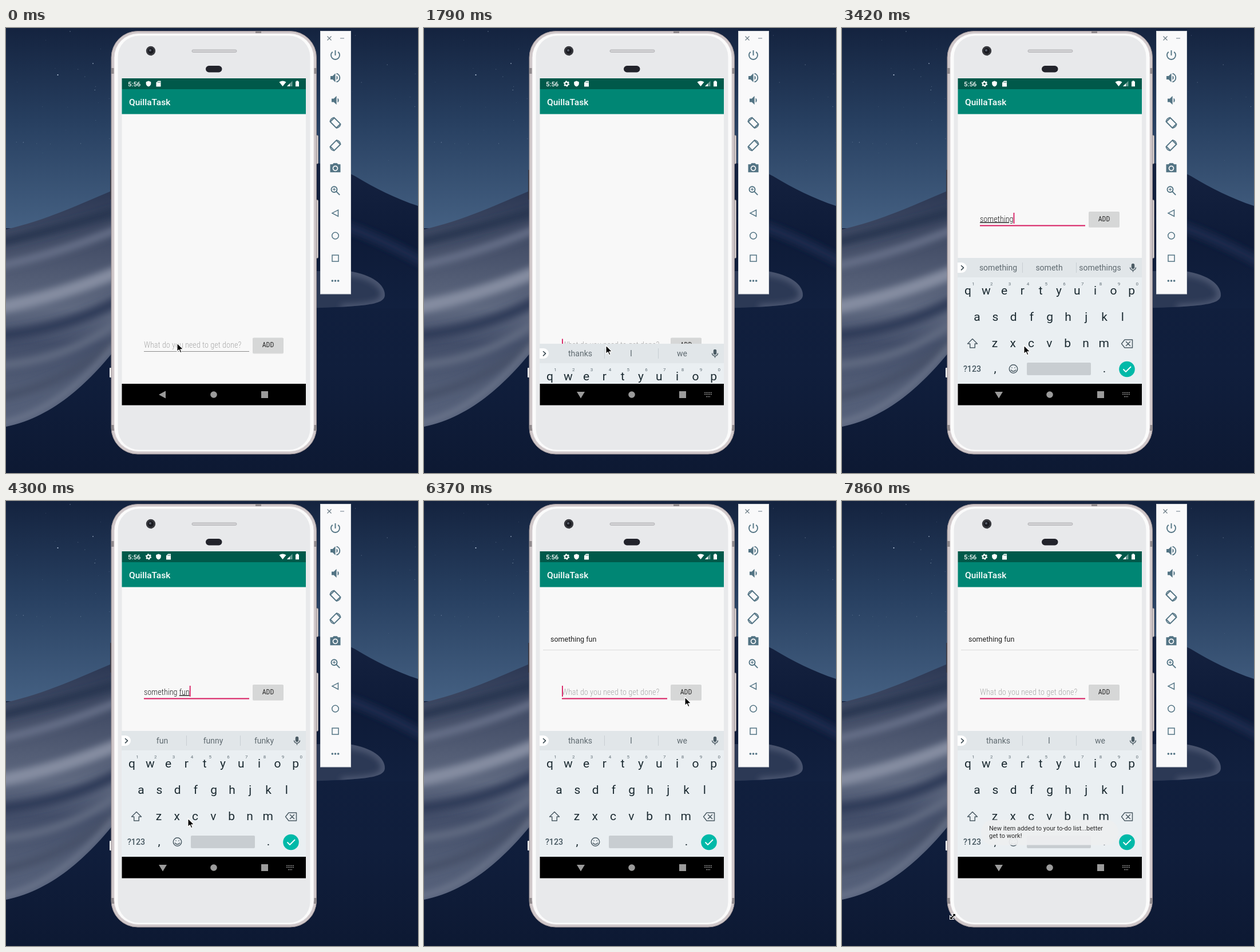
An HTML page that plays this animation: 720 px wide and 778 px high, repeating every 8000 ms.

```html
<!DOCTYPE html>
<html lang="en">
<head>
<meta charset="utf-8">
<title>To-do demo</title>
<style>
html, body { margin: 0; width: 100%; height: 100%; overflow: hidden; background: #101d3a; }
svg { display: block; width: 720px; height: 778px; }
text { font-family: Roboto, "Open Sans", sans-serif; white-space: pre; }
.narrow { font-family: "Roboto Condensed", Roboto, sans-serif; font-stretch: 75%; }
.mid { text-anchor: middle; }
.line { fill: none; stroke-linecap: round; stroke-linejoin: round; }
</style>
</head>
<body>
<svg viewBox="0 0 720 778">
<defs>
  <linearGradient id="sky" x1="0" y1="0" x2="0" y2="1">
    <stop offset="0" stop-color="#14233f"/><stop offset=".45" stop-color="#273f60"/><stop offset="1" stop-color="#466284"/>
  </linearGradient>
  <linearGradient id="dune" x1="0" y1="285" x2="0" y2="697" gradientUnits="userSpaceOnUse">
    <stop offset="0" stop-color="#2c3854"/><stop offset=".25" stop-color="#465069"/><stop offset=".5" stop-color="#5f6980"/>
    <stop offset=".65" stop-color="#434e69"/><stop offset=".85" stop-color="#525d76"/><stop offset="1" stop-color="#56617b"/>
  </linearGradient>
  <linearGradient id="shade" x1="0" y1="250" x2="0" y2="490" gradientUnits="userSpaceOnUse">
    <stop offset="0" stop-color="#14213f"/><stop offset=".5" stop-color="#0e1b38"/><stop offset="1" stop-color="#11203f"/>
  </linearGradient>
  <linearGradient id="ground" x1="0" y1="0" x2="0" y2="1">
    <stop offset="0" stop-color="#11203f"/><stop offset=".6" stop-color="#101e3c"/><stop offset="1" stop-color="#0d1933"/>
  </linearGradient>
  <filter id="soft" x="-30%" y="-30%" width="160%" height="160%"><feGaussianBlur stdDeviation="6"/></filter>
  <clipPath id="dunes"><path d="M0 352C70 336 125 310 200 278V550C150 615 85 680 0 697Z"/></clipPath>
  <clipPath id="tail"><path d="M500 425H600C640 432 662 448 662 467C661 483 635 488 500 490Z"/></clipPath>
  <clipPath id="page"><rect x="202" y="150.500" width="322" height="472"/></clipPath>
</defs>

<!-- wallpaper -->
<rect width="720" height="360" fill="url(#sky)"/>
<g id="stars" fill="#c5d3e6"/>
<rect y="350" width="720" height="428" fill="url(#ground)"/>
<path d="M500 230C560 236 585 246 610 259C645 280 680 298 720 311V490H500Z" fill="url(#shade)"/>
<path class="line" d="M560 335Q640 360 730 410" stroke="#1b2b4d" stroke-width="16" filter="url(#soft)"/>
<g clip-path="url(#tail)">
  <rect x="500" y="420" width="165" height="72" fill="#2c3955"/>
  <path class="line" d="M600 427C640 432 662 448 662 467C661 483 635 488 590 489" stroke="#56617a" stroke-width="10" filter="url(#soft)"/>
</g>
<g clip-path="url(#dunes)">
  <rect y="270" width="200" height="430" fill="url(#dune)"/>
  <g class="line" filter="url(#soft)" stroke-width="14">
    <path d="M-10 375Q90 352 200 318" stroke="#27344f"/>
    <path d="M-10 416Q90 395 200 350" stroke="#667088"/>
    <path d="M-10 488Q90 470 200 425" stroke="#858da1" stroke-width="22"/>
    <path d="M-10 538Q110 525 200 475" stroke="#323e5a" stroke-width="20"/>
    <path d="M-10 590Q110 580 200 510" stroke="#606a81"/>
    <path d="M-10 645Q100 625 200 540" stroke="#465169"/>
    <path d="M-10 692Q90 672 190 556" stroke="#737d92" stroke-width="7"/>
  </g>
</g>

<!-- phone -->
<g fill="#d9d3d4" stroke="#8f8789">
  <rect x="539.500" y="187.500" width="6" height="50" rx="2"/>
  <rect x="539.500" y="300.500" width="6" height="102" rx="2"/>
</g>
<rect x="181" y="594" width="5" height="17" rx="1" fill="#f3f3f3"/>
<rect x="182" y="248" width="3" height="52" fill="#30313d"/>
<rect x="184" y="5.500" width="358.500" height="739.500" rx="46" fill="#cfc7c9" stroke="#998f92"/>
<g fill="#8f898c">
  <path d="M184 70h8v10h-8zM535 70h8v10h-8zM184 694h8v10h-8zM535 694h8v10h-8zM436 5h10v5h-10z"/>
</g>
<rect x="189" y="9.500" width="349" height="731" rx="42" fill="#fbfbfb" stroke="#ddd6d8"/>
<rect x="195.500" y="13.500" width="336" height="724" rx="37" fill="#e8e9eb"/>
<rect x="325" y="38" width="78" height="4.500" rx="2.200" fill="#d1d1d3" stroke="#a9a9ac" stroke-width=".8"/>
<circle cx="253" cy="40" r="8.200" fill="#37383d"/><circle cx="253" cy="40" r="5" fill="#191a20"/><circle cx="252" cy="39" r="2" fill="#5b606c"/>
<rect x="349" y="66" width="28.500" height="11.500" rx="5.700" fill="#22232b"/>

<!-- app -->
<rect x="202.500" y="88" width="321.500" height="571" fill="#f8f8f8"/>
<rect x="202.500" y="107" width="321.500" height="43.500" fill="#008674"/>
<rect x="202.500" y="88" width="321.500" height="19" fill="#00594a"/>
<text x="215" y="134.500" font-size="15.500" font-weight="500" fill="#fff">QuillaTask</text>
<g fill="#fff">
  <text x="213" y="101.500" font-size="11.300" font-weight="500">5:56</text>
  <g id="gear" fill="none" stroke="#fff">
    <circle cx="249" cy="97.500" r="2.900" stroke-width="2"/>
    <circle cx="249" cy="97.500" r="4.400" stroke-width="1.600" stroke-dasharray="2.300 2.308"/>
  </g>
  <g id="notices">
    <path d="M249 92.500l4.300 1.700v3c0 2.600-1.800 4.600-4.300 5.400c-2.500-.8-4.300-2.800-4.300-5.400v-3z"/>
    <path d="M265.500 92.500h5v10h-8v-7z"/><path d="M265.500 94v2M267.300 94v2M269 94v2" stroke="#00594a" stroke-width=".7"/>
  </g>
  <path d="M477.500 94.500Q483.500 90.300 489.500 94.500L483.500 102Z"/>
  <path d="M500.500 92.500V102H491Z" opacity=".4"/><path d="M496 97v5h-5z"/>
  <path d="M507.500 92.300h3v1.200h1.500v8.800h-6v-8.800h1.500z"/>
</g>

<g clip-path="url(#page)">
  <g id="item">
    <text x="221" y="246" font-size="12.500" fill="#212121">something fun</text>
    <rect x="208" y="260" width="310" height="1" fill="#dadada"/>
  </g>
  <g id="entry">
    <text id="hint" class="narrow" x="241" y="559" font-weight="300" fill="#a9a9a9">What do you need to get done?</text>
    <text id="typed" class="narrow" x="241" y="559" font-weight="300" fill="#222"><tspan></tspan><tspan text-decoration="underline"></tspan></text>
    <rect id="underline" x="241" width="184"/>
    <rect id="caret" y="543.500" width="1.800" height="19" fill="#d81b60"/>
    <rect x="431" y="542.500" width="54" height="27" rx="2" fill="#000" opacity=".1"/>
    <rect x="431" y="541.500" width="54" height="27" rx="2" fill="#d6d7d7"/>
    <text class="narrow mid" x="458" y="558.300" font-size="12" fill="#2a2a2a">ADD</text>
  </g>
  <g id="keyboard">
    <rect x="202" y="402" width="322" height="221" fill="#eaeff2"/>
    <rect x="202" y="402" width="322" height="34" fill="#e1e6e9"/>
    <path d="M202 410h7a9 9 0 0 1 0 18h-7z" fill="#fff"/>
    <path class="line" d="M208.500 415.500l4 3.700l-4 3.700" stroke="#37474f" stroke-width="1.600"/>
    <path d="M315.500 410v18M409.500 410v18" stroke="#c8ced2"/>
    <g id="words" class="mid" font-size="14" fill="#5f6a70"></g>
    <g fill="none" stroke="#4c5c65" stroke-width="1.500">
      <rect x="506.500" y="412.500" width="4" height="8" rx="2" fill="#4c5c65"/>
      <path d="M503.500 418.500a5 5 0 0 0 10 0M508.500 423.500v3"/>
      <path class="line" d="M228 543.500l8.500 8.500h-4.200v7h-8.600v-7h-4.200z"/>
      <path class="line" d="M494 545h13.500v14H494l-5.500-7zM496.500 548.500l7 7M503.500 548.500l-7 7"/>
      <circle cx="299.500" cy="596" r="7.200"/>
      <path class="line" d="M295.500 598q4 4.500 8 0M296.900 593.800v.2M302.100 593.800v.2"/>
    </g>
    <g id="keys" class="mid" fill="#1b2a31" font-size="21">
      <text x="267.500" y="602">,</text><text x="458.500" y="602">.</text>
    </g>
    <text class="mid" x="227.500" y="601" font-size="14.200" font-weight="500" fill="#465760">?123</text>
    <rect x="323" y="585" width="112" height="22" rx="2" fill="#c8cdd1"/>
    <circle cx="498" cy="596.500" r="13.800" fill="#00b9a8"/>
    <path class="line" d="M492 597l4 4l8.500-8.500" stroke="#fff" stroke-width="1.800"/>
  </g>
  <g id="toast">
    <rect x="243" y="557.500" width="240" height="44" rx="21" fill="#eeeff0" opacity=".93"/>
    <g font-size="11" fill="#2b2b2b">
      <text x="257" y="576">New item added to your to-do list...better</text>
      <text x="257" y="589">get to work!</text>
    </g>
  </g>
</g>

<rect x="202.500" y="622" width="321.500" height="37.500" fill="#000"/>
<g fill="#9b9b9b">
  <path id="back"/>
  <circle cx="363" cy="641" r="5.800"/><rect x="446" y="635" width="12" height="12"/>
  <path id="imeIcon" d="M490 637.500h13M490 640.500h13M493 644.500h7" stroke="#9b9b9b" stroke-width="1.600" stroke-dasharray="1.700 1.100"/>
</g>

<!-- emulator toolbar -->
<rect x="549.500" y="5.500" width="53" height="459.500" fill="#f9f9fa" stroke="#d5d8dc"/>
<path d="M561.500 14.500l7 7M568.500 14.500l-7 7M584 18h7" stroke="#6b7b85" stroke-width="1.200"/>
<g id="tools" stroke="#537484" fill="none" stroke-width="1.900"></g>

<g id="arrow"><path d="M0 0V14.600L3.400 11.500L5.700 16.700L8 15.700L5.800 10.700H10.500Z" fill="#000" stroke="#fff" stroke-width="1.100" stroke-linejoin="round"/></g>
<g id="resize">
  <path d="M5 -5H-1.500L.7 -2.800L-2.800 .7L-5 -1.500V5H1.500L-.7 2.800L2.800 -.7L5 1.500Z" fill="#000" stroke="#fff" stroke-width="1.100"/>
</g>
</svg>

<script>
const LOOP = 8000;
const $ = id => document.getElementById(id);
const show = (id, on) => $(id).setAttribute("visibility", on ? "visible" : "hidden");
const move = (id, x, y) => $(id).setAttribute("transform", `translate(${x} ${y})`);
const label = (x, y, text, extra = "") => `<text x="${x}" y="${y}" ${extra}>${text}</text>`;

// Value of the last [time, ...value] entry that has begun.
const held = (track, t) => track.reduce((last, entry) => entry[0] <= t ? entry : last).slice(1);

function drawStars() {
  let seed = 11;
  const random = () => (seed = seed * 16807 % 2147483647) / 2147483647;
  let dots = "";
  for (let i = 0; i < 34; i++) {
    const x = i % 3 ? random() * 182 : 605 + random() * 115;
    dots += `<circle cx="${x}" cy="${random() * 250}" r="${.3 + random() * .4}" opacity="${.2 + random() * .4}"/>`;
  }
  $("stars").innerHTML = dots + '<circle cx="90.500" cy="82" r="1"/><circle cx="152" cy="62" r=".8"/>';
}

function drawKeys() {
  const rows = [["qwertyuiop", 220, 466], ["asdfghjkl", 236, 512], ["zxcvbnm", 267, 558]];
  const letters = rows.flatMap(([row, x, y]) => [...row].map((c, i) => label(x + i * 31.8, y, c)));
  const digits = [..."1234567890"].map((d, i) =>
    label(229.5 + i * 31.8, 450, d, 'font-size="8" fill="#5f6d75"'));
  $("keys").innerHTML += letters.join("") + digits.join("");
}

function drawTools() {
  const speaker = x => `<path d="M${x} -3h3.800l4.800-4.700v15.400l-4.800-4.700h-3.800z" fill="#537484" stroke="none"/>`;
  const turn = '<rect x="-5" y="-7.500" width="10" height="15" rx="1" transform="rotate(-45)"/>' +
    '<path d="M-9.500 -1.500A9.800 9.800 0 0 1 -1.500 -9.500M1.500 9.500A9.800 9.800 0 0 0 9.500 1.500" stroke-width="1.500"/>';
  const icons = [
    '<path d="M0 -8.500v9M-4.800 -5.800a7.500 7.500 0 1 0 9.600 0"/>',
    speaker(-8.5) + '<path d="M2 -3.800a4.300 4.300 0 0 1 0 7.600z" fill="#537484" stroke="none"/><path d="M2 -7.300a7.500 7.500 0 0 1 0 14.600"/>',
    speaker(-6.5) + '<path d="M4 -3.800a4.300 4.300 0 0 1 0 7.600z" fill="#537484" stroke="none"/>',
    turn,
    `<g transform="scale(-1 1)">${turn}</g>`,
    '<path d="M-3 -8.500h6l1.700 2h4.300v14h-18v-14h4.300z" fill="#537484" stroke="none"/><circle cy=".6" r="4" stroke="#f9f9fa" stroke-width="1.700"/>',
    '<circle cx="-2" cy="-2" r="5"/><path d="M1.700 1.700l6 6"/><path d="M-4.500 -2h5M-2 -4.500v5" stroke-width="1.200"/>',
    '<path d="M5 -5.500v11l-10.500-5.500z" stroke-width="1.500"/>',
    '<circle r="5.800" stroke-width="1.500"/>',
    '<rect x="-5.500" y="-5.500" width="11" height="11" stroke-width="1.500"/>',
    '<path d="M-5.200 0h.1M-.050 0h.1M5.100 0h.1" stroke-width="3.600" stroke-linecap="round"/>'
  ];
  $("tools").innerHTML = icons.map((icon, i) =>
    `<g transform="translate(575.500 ${47.500 + i * 39.450})">${icon}</g>`).join("");
}

// One font size for the entry field, so the prompt keeps its place.
function sizeEntry() {
  const hint = $("hint");
  hint.setAttribute("font-size", 14.4);
  const size = 14.4 * 170 / hint.getComputedTextLength();
  for (const id of ["hint", "typed"]) $(id).setAttribute("font-size", size.toFixed(2));
}

const pointer = [
  [0, 299, 551], [1050, 303, 552], [1200, 314, 555], [1340, 318, 555],
  [4600, 316, 520], [4750, 308, 450], [4900, 306, 382], [5030, 345, 356],
  [5180, 425, 345], [5320, 466, 340], [5470, 459, 338],
  [6370, 456, 343], [6520, 445, 356], [6670, 434, 365], [6820, 365, 480],
  [6970, 245, 665], [7120, 193, 727]
];
const carets = [
  [0, false], [1640, true], [2090, false], [2690, true], [4750, false], [5180, true],
  [5770, false], [6220, true], [6820, false], [7270, true], [7860, false]
];
// Finished text, then the word being composed.
const typing = [
  [0, "", ""], [2840, "", "s"], [2990, "", "some"], [3140, "", "someth"], [3270, "", "somethin"],
  [3420, "", "something"], [3720, "something ", ""], [3870, "something ", "f"],
  [4010, "something ", "fu"], [4160, "something ", "fun"], [6220, "", ""]
];
const suggestions = [
  [0, "thanks", "I", "we"], [2840, "so", "see", "she"], [2990, "some", "someone", "something"],
  [3270, "something", "someth", "somethings"], [3720, "like", "to", "else"],
  [3870, "for", "from", "f"], [4010, "full", "fun", "further"], [4300, "fun", "funny", "funky"],
  [6220, "thanks", "I", "we"]
];
const keyboardDrop = [[0, 240], [1790, 150], [1940, 35], [2090, 0]];
const toastFade = [[0, 0], [6520, .25], [6670, .72], [6820, 1]];

function draw(t) {
  const focused = t >= 1640;
  $("gear").setAttribute("opacity", held([[0, 0], [150, .4], [300, 1]], t)[0]);
  move("notices", held([[0, 0], [150, 11], [300, 17.5]], t)[0], 0);

  const [done, composing] = held(typing, t);
  const [first, second] = $("typed").children;
  first.textContent = done;
  second.textContent = composing;
  show("hint", !done && !composing);
  const width = done || composing ? $("typed").getComputedTextLength() : 0;
  $("caret").setAttribute("x", 241 + width);
  show("caret", held(carets, t)[0]);

  const underline = $("underline");
  underline.setAttribute("y", 565);
  underline.setAttribute("height", focused ? 2 : 1);
  underline.setAttribute("fill", focused ? "#d81b60" : "#8c8c8c");
  move("entry", 0, t >= 1940 ? -220.5 : 0);

  move("keyboard", 0, held(keyboardDrop, t)[0]);
  $("words").innerHTML = held(suggestions, t).map((word, i) => label(273 + i * 89, 424, word)).join("");
  $("back").setAttribute("d", focused ? "M267 636H281L274 647.500Z" : "M279 634.500V647.500L267 641Z");
  show("imeIcon", focused);

  show("item", t >= 6220);
  $("toast").setAttribute("opacity", held(toastFade, t)[0]);

  const resizing = t >= 7860 || (t >= 7270 && t < 7570);
  show("arrow", !resizing);
  show("resize", resizing);
  move("arrow", ...held(pointer, t));
  move("resize", ...(t >= 7860 ? [193.5, 726.5] : [198, 735]));
}

drawStars();
drawKeys();
drawTools();
sizeEntry();
const start = performance.now();
function tick() {
  draw((performance.now() - start) % LOOP);
  requestAnimationFrame(tick);
}
tick();
</script>
</body>
</html>
```
